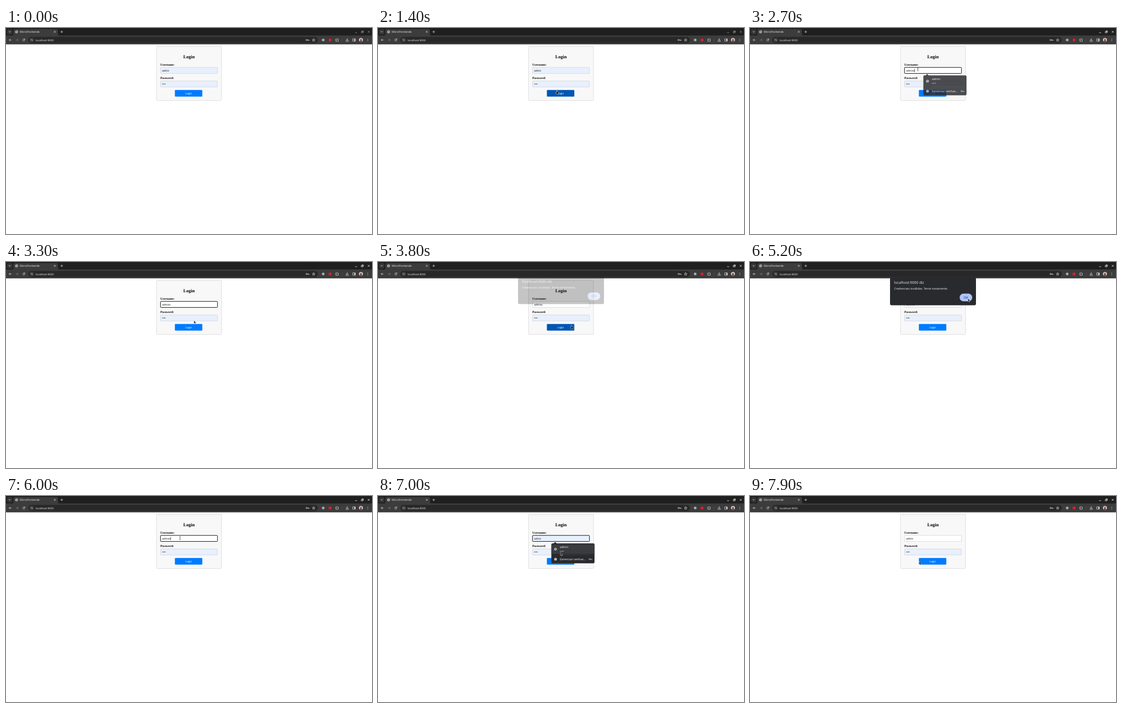
These frames come from a looping animation (690 px wide and 388 px high, 8 s). An HTML page:

```html
<!DOCTYPE html>
<html lang="pt">
<head>
<meta charset="utf-8">
<title>Login</title>
<style>
  html, body { margin: 0; width: 100%; height: 100%; overflow: hidden; background: #fff; }
  svg { display: block; width: 690px; height: 388px; text-rendering: geometricPrecision; }
  text { white-space: pre; }
  .ui { font-family: "Noto Sans", "Open Sans", sans-serif; fill: #e8eaed; }
  .serif { font-family: "Liberation Serif", serif; font-weight: bold; fill: #000; }
  .sans { font-family: "Liberation Sans", sans-serif; font-size: 4.79px; fill: #111; }
  .line { fill: none; stroke: #d6d6d8; stroke-width: .8; stroke-linecap: round; stroke-linejoin: round; }
</style>
</head>
<body>
<svg viewBox="0 0 690 388" xmlns="http://www.w3.org/2000/svg">
  <defs>
    <clipPath id="below"><rect x="250" y="28.5" width="190" height="70"/></clipPath>
    <g id="globe">
      <circle r="2.6" fill="#c8cacd"/>
      <path d="M-1.9-1.2Q-.3-1.6 0-.5T-1 1M.5-1.9Q.5-.6 1.8-.4M.3 1.9Q.4.6 1.7.8" fill="none" stroke="#3c3c3c" stroke-width=".7"/>
    </g>
    <g id="keyIcon">
      <circle cx="-1.7" r="1.3"/>
      <path d="M-.4 0H3V1.2M1.6 0V1"/>
    </g>
  </defs>

  <rect width="690" height="388" fill="#fff"/>

  <!-- login form -->
  <rect x="283.7" y="34.7" width="122.6" height="101.8" rx="1.8" fill="#f8f8f9" stroke="#ccc" stroke-width=".6"/>
  <text class="serif" x="345" y="56.6" font-size="8.6" text-anchor="middle">Login</text>
  <text class="serif" x="291" y="70.7" font-size="5.75">Username:</text>
  <text class="serif" x="291" y="96.2" font-size="5.75">Password:</text>
  <rect id="user" x="291.3" y="74.2" width="107.4" height="11.4" rx="1"/>
  <text id="name" class="sans" x="294.3" y="81.7"></text>
  <path id="caret" d="M0 77V83" stroke="#000" stroke-width=".6"/>
  <rect x="291.3" y="99.7" width="107.4" height="11.4" rx="1" fill="#e8f0fe" stroke="#c4c6cc" stroke-width=".6"/>
  <text class="sans" x="294.3" y="107.1">••••</text>
  <rect id="submit" x="318.4" y="116.8" width="51.7" height="12.5" rx="1.4"/>
  <text class="sans" x="344.2" y="124.8" text-anchor="middle" style="font-size:4.9px;fill:#fff">Login</text>

  <!-- browser frame -->
  <rect width="690" height="16" fill="#1f1f1f"/>
  <rect y="14" width="690" height="16.8" fill="#3c3c3c"/>
  <path d="M11 14.2Q14 14 14 11V5Q14 2 17 2H95Q98 2 98 5V11Q98 14 101 14.2Z" fill="#3c3c3c"/>
  <rect x="2" y="2.2" width="10" height="10" rx="3" fill="#363636"/>
  <path class="line" d="M5.4 6.5L7 8L8.600 6.5"/>
  <use href="#globe" x="20" y="7.2"/>
  <text class="ui" x="26" y="9.1" font-size="5.2">Microfrontends</text>
  <path class="line" d="M90.600 5.800L93.400 8.600M93.400 5.800L90.600 8.600M103 7.200H107M105 5.200V9.200"/>
  <g id="controls" class="line">
    <path d="M658.600 8.800H661.400M682.400 5.800L685.200 8.600M685.200 5.800L682.400 8.600"/>
    <path d="M670.200 6.600H672.800V9.200H670.200ZM671.200 6.400V5.400H673.800V8H673"/>
  </g>
  <rect x="42" y="16.8" width="546" height="11.600" rx="5.800" fill="#282828"/>
  <path class="line" d="M10 22.600H6M7.800 20.800L6 22.600L7.800 24.400"/>
  <path class="line" d="M19 22.600H23M21.200 20.800L23 22.600L21.200 24.400" style="stroke:#808080"/>
  <path class="line" d="M35.300 21.500A2 2 0 1 0 35.500 23.400M35.600 20.300V21.800H34.100"/>
  <circle cx="48.600" cy="22.600" r="4" fill="#3c3c3c"/>
  <path class="line" d="M46.800 21.500H48.300M50.300 21.500H50.400M46.800 23.800H46.900M48.900 23.800H50.400"/>
  <text class="ui" x="56" y="24.500" font-size="5">localhost:9000</text>
  <use href="#keyIcon" class="line" x="568.300" y="22.600"/>
  <path class="line" d="M580 20L580.800 21.900L582.700 22L581.200 23.200L581.700 25L580 24L578.300 25L578.800 23.200L577.300 22L579.200 21.900Z" style="stroke-width:.7"/>
  <circle cx="598" cy="22.600" r="2.500" fill="#a9abad"/>
  <circle cx="611" cy="22.600" r="2.900" fill="#d6202b"/>
  <path class="line" d="M621.800 21H623.300A.8 .8 0 0 1 624.900 21H626.400V25H621.800V23.700A.8 .8 0 0 0 621.800 22.100Z"/>
  <path d="M633.500 19.500V25.500" stroke="#5b5b5b" stroke-width=".6"/>
  <path class="line" d="M643.200 19.800V23.200M641.700 21.900L643.200 23.300L644.700 21.900M640.900 23.800V25.100H645.500V23.800"/>
  <path class="line" d="M654 20.400H658.600V24.800H654Z"/>
  <rect x="656.600" y="20.400" width="2" height="4.400" fill="#d6d6d8"/>
  <circle cx="669.200" cy="22.500" r="3.700" fill="#dccfca"/>
  <path d="M666.800 25.300Q667 23.400 668.300 23.100A1.500 1.500 0 1 1 670.100 23.100Q671.400 23.400 671.600 25.300Q669.200 27.100 666.800 25.300Z" fill="#6d4640"/>
  <g fill="#d6d6d8"><circle cx="682" cy="20.600" r=".55"/><circle cx="682" cy="22.600" r=".55"/><circle cx="682" cy="24.600" r=".55"/></g>

  <!-- password suggestions -->
  <g id="popup">
    <path d="M329 89.200H331.300L334 86.400L336.700 89.200H406Q408.200 89.200 408.200 91.400V124.600Q408.200 126.800 406 126.800H329Q326.800 126.800 326.800 124.600V91.400Q326.800 89.200 329 89.200Z" fill="#292a2d"/>
    <rect id="row" x="326.800" y="91.400" width="81.400" height="17.600" fill="#3a3b3e"/>
    <path d="M342.500 110.700H400.500" stroke="#4a4b4f" stroke-width=".5"/>
    <use href="#globe" x="334.700" y="100"/>
    <text class="ui" x="342.700" y="97.900" font-size="5.400" font-weight="500">admin</text>
    <text class="ui" x="342.700" y="106.100" font-size="5.400">••••</text>
    <circle cx="334.700" cy="119" r="2.600" fill="#b8bbc0"/>
    <text class="ui" x="342.500" y="121" font-size="5.500">Gerenciar senhas…</text>
    <use href="#keyIcon" class="line" x="400.500" y="119" style="stroke:#8ab4f8"/>
  </g>

  <!-- alert -->
  <g clip-path="url(#below)">
    <g id="alert">
      <rect x="264" y="28.800" width="162" height="52.800" rx="3" fill="#292a2d"/>
      <text class="ui" x="271.800" y="41.200" font-size="6.700" font-weight="500">localhost:9000 diz</text>
      <text class="ui" x="271.800" y="51.900" font-size="5.400">Credenciais inválidas. Tente novamente.</text>
      <rect x="395.200" y="59.600" width="23.800" height="14.400" rx="7.200" fill="#afc3f6"/>
      <text class="ui" x="407.100" y="68.800" font-size="5.700" font-weight="500" text-anchor="middle" style="fill:#14305f">OK</text>
    </g>
  </g>

  <g id="cursor">
    <path id="arrow" d="M0 0V5.700L1.400 4.500L2.300 6.500L3.300 6L2.400 4.100H4.100Z" fill="#111" stroke="#fff" stroke-width=".45"/>
    <path id="hand" d="M-.6 0Q0-.7 .6 0V2L3 2.500Q3.700 2.700 3.600 3.500L3 6.300H-.3L-2 3.900Q-1.900 3-.6 3.800Z" fill="#111" stroke="#fff" stroke-width=".5"/>
    <path id="beam" d="M-1-2.900Q0-2.900 0-2.300Q0-2.900 1-2.900M0-2.300V2.300M-1 2.900Q0 2.900 0 2.300Q0 2.900 1 2.900" fill="none" stroke="#222" stroke-width=".7"/>
  </g>
</svg>
<script>
const LOOP = 8000, STEP = 100;
const $ = id => document.getElementById(id);
const set = (id, attrs) => { for (const k in attrs) $(id).setAttribute(k, attrs[k]); };
const show = (id, on) => set(id, { visibility: on ? "visible" : "hidden" });
const within = (t, a, b) => t >= a && t < b;

// time, x, y, pointer shape from that time on
const path = [
  [300, 400, 297, "arrow"], [700, 384, 215, "arrow"], [1100, 350, 131, "arrow"],
  [1200, 342, 122, "hand"], [1400, 337, 118, "hand"], [1500, 333, 117, "hand"],
  [1600, 321, 92, "arrow"], [1700, 316.5, 78, "beam"], [2900, 316.5, 78, "beam"],
  [3100, 334, 92, "arrow"], [3400, 364.5, 119.5, "hand"], [4000, 364.5, 119.5, "hand"],
  [4200, 364, 98, "arrow"], [4400, 362, 75, "arrow"], [5000, 411, 69, "arrow"],
  [5400, 411, 69, "arrow"], [5900, 328, 79.5, "beam"], [6800, 328, 79.5, "beam"],
  [6900, 336, 92, "arrow"], [7000, 344, 106.5, "arrow"], [7200, 331, 119, "arrow"],
  [7400, 319.3, 123.4, "arrow"], [8000, 319.3, 123.4, "arrow"]
];
// time, opacity; linear between
const popupFade = [[1899, 0], [1900, 1], [2600, 1], [2700, .83], [2800, .4], [2900, 0],
  [6799, 0], [6800, 1], [7600, 1], [7700, .6], [7800, .25], [7900, 0]];
const alertFade = [[3700, 0], [3800, .27], [3900, .75], [4000, 1], [5200, 1], [5300, .6], [5400, .2], [5500, 0]];

function at(keys, t, col) {
  if (t <= keys[0][0]) return keys[0][col];
  for (let i = 1; i < keys.length; i++) {
    const a = keys[i - 1], b = keys[i];
    if (t < b[0]) return a[col] + (b[col] - a[col]) * (t - a[0]) / (b[0] - a[0]);
  }
  return keys[keys.length - 1][col];
}

function drawCursor(t) {
  const on = t >= path[0][0];
  const key = path.filter(k => k[0] <= t).pop();
  set("cursor", { transform: `translate(${at(path, t, 1)} ${at(path, t, 2)})` });
  for (const id of ["arrow", "hand", "beam"]) show(id, on && key[3] === id);
}

function draw(t) {
  const focus = within(t, 1900, 3500) || within(t, 5900, 7700);
  const preview = within(t, 6900, 7200);
  const typed = within(t, 2700, 6800);
  set("user", {
    fill: t < 2700 || preview ? "#e8f0fe" : "#fff",
    stroke: focus ? "#101010" : "#c8c8cb",
    "stroke-width": focus ? 1 : .6
  });
  $("name").textContent = typed ? "admina" : "admin";
  set("caret", { transform: `translate(${typed ? 310.4 : 307.6} 0)` });
  show("caret", within(t, 1900, 2500) || within(t, 2700, 3200) || within(t, 5900, 6400));

  const hover = within(t, 1200, 1600) || within(t, 3400, 4200);
  set("submit", { fill: hover ? "#0056b3" : "#007bff" });
  set("controls", { style: `stroke:${t < 1900 ? "#9a9a9c" : "#f4f4f5"}` });

  set("popup", { opacity: at(popupFade, t, 1) });
  show("row", preview);
  const a = at(alertFade, t, 1);
  set("alert", { opacity: a, transform: `translate(0 ${-3.2 * (1 - a)})` });
  drawCursor(t);
}

const start = performance.now();
function tick() {
  const t = (performance.now() - start) % LOOP;
  draw(Math.floor(t / STEP) * STEP);
  requestAnimationFrame(tick);
}
tick();
</script>
</body>
</html>
```
